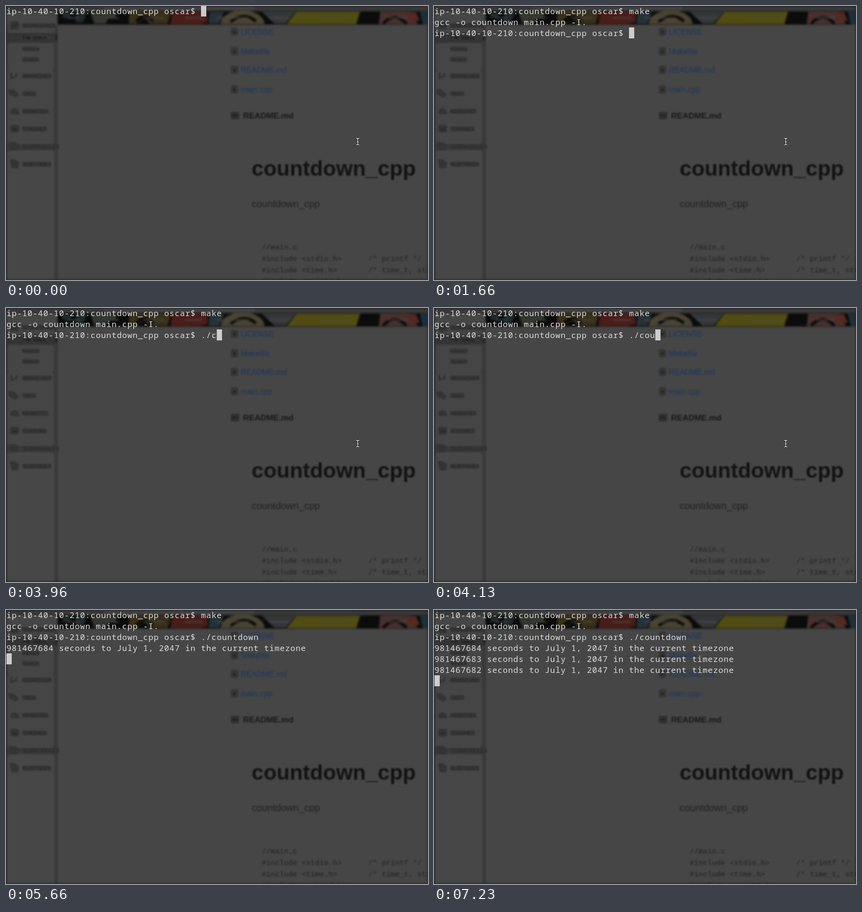
Write an HTML page that moves like this. It is 883 px wide and 575 px high and loops after 8 s.

```html
<!DOCTYPE html>
<html lang="en">
<head>
<meta charset="utf-8">
<title>Countdown terminal</title>
<style>
  html, body { margin: 0; width: 883px; height: 575px; overflow: hidden; background: #464646; }
  svg, #screen, #caret, #edge { position: absolute; left: 0; top: 0; }
  .blur { filter: blur(1.5px); }
  .band { filter: blur(2.2px); }
  #edge { width: 883px; height: 575px; box-shadow: inset 0 0 4px 1px #242424; }
  #screen {
    left: 1px; top: -1px; margin: 0; color: #dcdcdc;
    font: 17px/23px "Noto Sans Mono", monospace;
    letter-spacing: calc(11px - .6em); font-variant-ligatures: none;
  }
  #caret { width: 11px; height: 23px; background: rgba(218, 218, 218, .92); }
  text { white-space: pre; font-family: "Liberation Sans", Arial, sans-serif; }
  .code text { font: 15.5px "Liberation Mono", monospace; }
</style>
</head>
<body>
<svg width="883" height="575" viewBox="0 0 883 575">
  <rect width="883" height="575" fill="#464646"/>
  <rect width="883" height="12" fill="#393939"/>
  <path d="M205 0H520V8H205Z" fill="#434343" class="blur"/>

  <g class="band">
    <rect x="108" y="11" width="790" height="28" fill="#0b0b0b"/>
    <path d="M118 13h17v12h-17zM146 12h24l-9 22h-15z" fill="#202a2d"/>
    <path d="M176 12h58l-6 13h-14l-5 12h-24z" fill="#33372f"/>
    <path d="M258 12h88l-8 25h-38l-9-14-18 14h-16z" fill="#393019"/>
    <path d="M348 12h74v22l-18 4h-60z" fill="#491d19"/>
    <path d="M426 13h30l-10 24h-22z" fill="#26323a"/>
    <path d="M449 38a46 29 0 0 1 92 0z" fill="#4a4331"/>
    <path d="M535 12h72l-22 25h-23z" fill="#34373a"/>
    <path d="M608 12h133l-8 26H587z" fill="#504c12"/>
    <path d="M783 12h64l15 26h-82z" fill="#49302d"/>
    <path d="M838 13h20l8 18h-20z" fill="#552820"/>
    <path d="M866 12h30v27h-24z" fill="#1d303d"/>
    <path d="M272 32q18-18 36-1M470 33q28-22 53-1M789 37q24-26 49 0" fill="none" stroke="#080808" stroke-width="6"/>
    <path d="M128 25h25M210 25h26M287 25h45M374 25h38M441 25h67M550 25h42M656 25h65M800 25h38"
          stroke="#4c4c47" stroke-width="4" opacity=".55"/>
  </g>

  <g class="blur">
    <rect y="40" width="109" height="540" fill="#3a3a3a"/>
    <rect x="3" y="39" width="98" height="17" rx="5" fill="#444"/>
    <rect x="3" y="78" width="97" height="58" rx="6" fill="#454545"/>
    <rect x="2" y="135" width="98" height="155" rx="6" fill="#454545"/>
    <rect x="2" y="303" width="99" height="290" rx="7" fill="#474747"/>
    <rect x="3" y="57" width="104" height="19" fill="#343434"/>
    <path d="M105 60v12" stroke="#222" stroke-width="4"/>
  </g>
  <g id="sidebar"></g>
  <g class="blur" fill="#343434" stroke="#343434">
    <rect x="9" y="33" width="18" height="16" rx="4"/>
    <path d="M11 140v13M11 151l11-4v-6" fill="none" stroke-width="4"/>
    <path d="M5 175h10l12 11-7 6-13-7z"/>
    <path d="M10 226q-3-8 6-11 9 0 11 8v4z"/>
    <rect x="9" y="250" width="18" height="15" rx="4"/>
    <path d="M6 286h13l9 7-5 9H9z"/>
    <path d="M8 322h10l9 6-2 12H12z"/>
    <path d="M12 41h11M13 259h10" stroke="#262626" stroke-width="3"/>
  </g>

  <g id="files" class="blur"></g>
  <g class="blur" font-weight="bold">
    <rect x="470" y="222" width="18" height="16" rx="4" fill="#303030"/>
    <path d="M474 230h10" stroke="#222" stroke-width="4"/>
    <text x="496" y="236" font-size="17.3" fill="#181818">README.md</text>
    <text x="514" y="356" font-size="44.8" fill="#131313">countdown_cpp</text>
  </g>
  <g class="blur code" fill="#202020">
    <text x="514" y="422" style="font:20.4px 'Liberation Sans',sans-serif">countdown_cpp</text>
    <text x="535" y="511">//main.c</text>
    <text x="535" y="535">#include &lt;stdio.h&gt;      /* printf */</text>
    <text x="535" y="559">#include &lt;time.h&gt;       /* time_t, struct</text>
    <text x="535" y="583">#include &lt;unistd.h&gt;</text>
  </g>

  <g id="pointer" fill="none">
    <path id="beam" d="M733 277.5q3 0 3 2.5 0-2.5 3-2.5M736 280v9M733 291.5q3 0 3-2.5 0 2.5 3 2.5M734.5 285h3"
          stroke="#1c1c1c" stroke-width="3"/>
    <use href="#beam" style="stroke:#ddd"/>
    <path d="M733 277.5q3 0 3 2.5 0-2.5 3-2.5M736 280v9M733 291.5q3 0 3-2.5 0 2.5 3 2.5M734.5 285h3"
          stroke="#e4e4e4" stroke-width="1.3"/>
  </g>
</svg>
<div id="edge"></div>
<div id="caret"></div>
<pre id="screen"></pre>

<script>
const $ = id => document.getElementById(id);

const sidebar = [
  ['WORKSPACE', 41, 70], ['File status', 66, 55], ['History', 90, 38], ['Search', 112, 36],
  ['BRANCHES', 147, 62], ['TAGS', 184, 29], ['REMOTES', 221, 55], ['STASHES', 258, 52],
  ['SUBMODULES', 295, 76], ['SUBTREES', 332, 62]
];
$('sidebar').innerHTML = sidebar.map(([label, y, w]) => `<g class="blur">
  <rect x="33" y="${y - 5}" width="${w}" height="10" rx="5" fill="#393939"/>
  <text x="35" y="${y + 4}" font-size="11" fill="${y === 66 ? '#0c0c0c' : '#242424'}">${label}</text></g>`).join('');

const files = [['LICENSE', 54], ['Makefile', 95], ['README.md', 134], ['main.cpp', 175]];
$('files').innerHTML = files.map(([name, y]) => `
  <rect x="470" y="${y - 9}" width="16" height="18" rx="5" fill="#363636"/>
  <circle cx="478" cy="${y + 1}" r="3" fill="#242424"/>
  <text x="491" y="${y + 6}" font-size="16.3" fill="#263a58" stroke="#263a58" stroke-width=".5">${name}</text>`).join('');

const LOOP = 8000;
const prompt = 'ip-10-40-10-210:countdown_cpp oscar$ ';
const tick = n => `${n} seconds to July 1, 2047 in the current timezone\n`;
const output = [
  [0, prompt], [680, 'm'], [770, 'a'], [850, 'k'], [1030, 'e'],
  [1660, '\ngcc -o countdown main.cpp -I.\n' + prompt],
  [3070, '.'], [3160, '/'], [3960, 'c'], [4050, 'o'], [4130, 'u'],
  [4310, 'n'], [4400, 't'], [4760, 'down '],
  [5120, '\n' + tick(981467684)], [6110, tick(981467683)], [7180, tick(981467682)]
];

function draw(now) {
  const t = now % LOOP;
  const text = output.filter(([at]) => at <= t).map(([, s]) => s).join('');
  const lines = text.split('\n');
  const row = lines.length - 1;
  $('screen').textContent = text;
  $('caret').style.transform = `translate(${1 + 11 * lines[row].length}px, ${23 * row - 1}px)`;
  $('pointer').setAttribute('transform', t < 5570 ? '' : 'translate(28 -2)');
  $('pointer').style.display = t < 5660 ? '' : 'none';
  requestAnimationFrame(draw);
}
requestAnimationFrame(draw);
</script>
</body>
</html>
```
